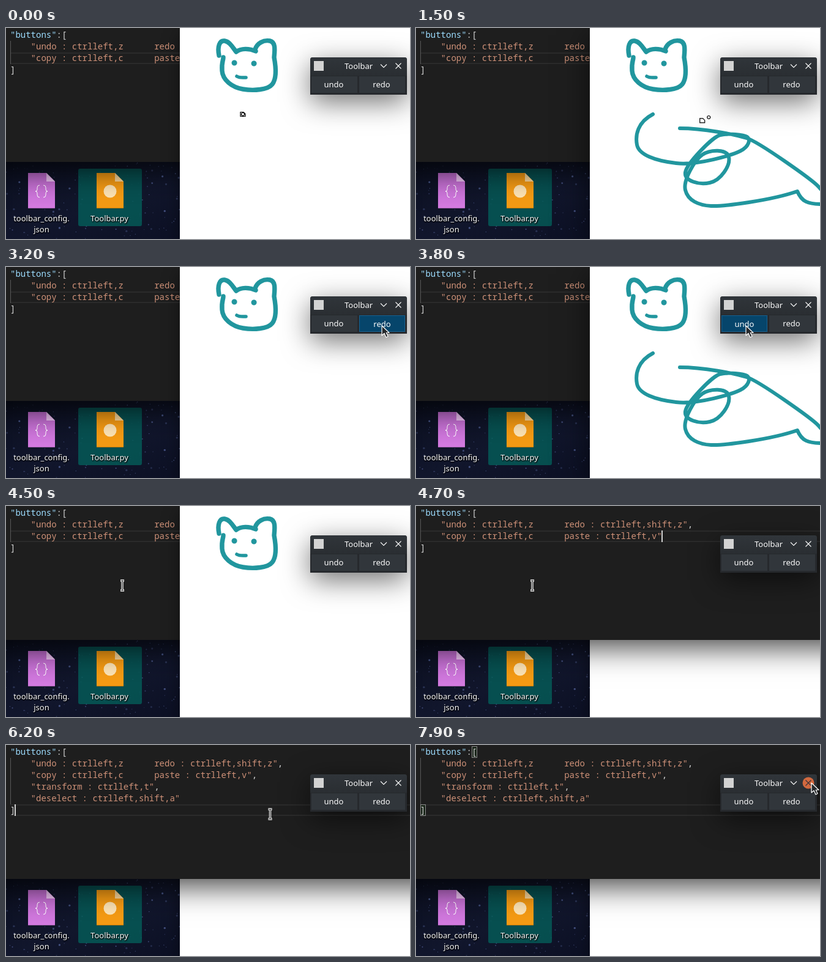
Write an HTML page that moves like this. It is 660x345 px and loops after 8 s.

```html
<!DOCTYPE html>
<html lang="en">
<head>
<meta charset="utf-8">
<title>Toolbar demo</title>
<style>
html, body { margin: 0; width: 100%; height: 100%; overflow: hidden; background: #fff; }
#stage { position: relative; width: 660px; height: 345px; overflow: hidden; font: 13px/18px "Noto Sans", sans-serif; color: #fcfcfc; }
#stage div, #stage svg { position: absolute; }
#stage svg { overflow: visible; }
#desktop { left: 0; top: 219px; width: 284px; height: 126px; overflow: hidden; background: linear-gradient(160deg, #0b0f20, #11162c 55%, #0c1024); }
#selected { left: 118px; top: 11px; width: 104px; height: 94px; border-radius: 3px; background: rgba(4, 92, 88, .82); }
.label { top: 83px; width: 110px; text-align: center; text-shadow: 0 1px 2px #000, 1px 1px 2px #000; }
#canvas { left: 284px; top: 0; width: 500px; height: 345px; background: #fff; z-index: 2; box-shadow: 0 8px 26px rgba(0, 0, 0, .45); }
#canvas.active { box-shadow: 0 12px 46px rgba(0, 0, 0, .6); }
#editor { left: -60px; top: -60px; width: 800px; height: 279px; background: #1e1e1e; z-index: 1; box-shadow: 0 12px 46px rgba(0, 0, 0, .74); }
#editor.active { z-index: 3; }
#code { left: 60px; top: 60px; width: 660px; height: 219px; font: 14px/19px "Noto Sans Mono", "DejaVu Sans Mono", monospace; color: #d4d4d4; }
#code .line { left: 7px; margin-top: -1px; white-space: pre; height: 19px; }
#code b { font-weight: normal; color: #9cdcfe; }
#code i { font-style: normal; color: #ce9178; }
#code .sel { background: #264f78; height: 19px; }
#code .dots { left: 7px; margin-top: -1px; color: #4d7094; }
#current { left: 7px; width: 653px; height: 15px; border: solid #2b2b2b; border-width: 2px 0; }
#guide { left: 7px; top: 21px; width: 1px; background: #585858; }
#caret { width: 2px; height: 19px; background: #d0d0d0; }
.match { width: 7px; height: 17px; border: 1px solid #888; background: rgba(0, 100, 0, .12); }
#toolbar { left: 497px; top: 48px; width: 158px; height: 61px; border-radius: 4px 4px 0 0; background: #26292d; z-index: 4; box-shadow: 0 12px 46px rgba(0, 0, 0, .56); }
#title { left: 0; top: 0; width: 158px; height: 30px; border-radius: 4px 4px 0 0; background: linear-gradient(#30353a, #2a2e32); }
#title span { position: absolute; left: 56px; top: 5px; }
.button { top: 31px; width: 75px; height: 27px; line-height: 27px; text-align: center; background: #31363b; }
.button span { position: relative; left: -1px; }
.button.hover { background: #06456b; outline: 1px dotted #2980b9; outline-offset: -1px; }
.button.down span { left: 0; top: 1px; }
#cursors { left: 0; top: 0; z-index: 5; }
</style>
</head>
<body>
<div id="stage">
  <div id="desktop">
    <svg id="stars" width="284" height="126"></svg>
    <div id="selected"></div>
    <svg id="icons" width="284" height="126"></svg>
    <div class="label" style="left:3px">toolbar_config.<br>json</div>
    <div class="label" style="left:114px">Toolbar.py</div>
  </div>
  <div id="canvas">
    <svg width="376" height="345" viewBox="284 0 376 345" fill="none" stroke="#21969e" stroke-linecap="round" stroke-linejoin="round">
      <g stroke-width="7.4">
        <path d="M348 45C345 30 349 20 357 21S370 31 376 39C384 33 397 33 408 38"/>
        <path d="M407 35C410 25 421 19 431 21S439 37 438 48C441 64 442 83 435 92S405 103 387 100S354 85 353 70S355 54 355 48"/>
        <path d="M373 57h.1M405 58h.1" stroke-width="9"/>
        <path d="M377 79C382 82 387 81 392 81" stroke-width="5.5"/>
      </g>
      <path id="doodle" stroke-width="6" d="M387 141C362 154 358 175 361 191S390 217 425 221S516 208 530 201S547 182 541 178S510 172 497 175S442 222 440 236S462 257 480 253S514 225 511 211S480 199 468 207S436 248 440 265S462 290 482 291S580 282 623 267C630 284 640 288 664 288S666 270 658 260S560 186 540 180S470 164 431 164"/>
    </svg>
  </div>
  <div id="editor"><div id="code">
    <div id="current"></div>
    <div id="selection">
      <div class="sel" style="left:402px;top:40px;width:16px"></div>
      <div class="sel" style="left:0;top:59px;width:258px"></div>
      <div class="sel" style="left:0;top:78px;width:284px"></div>
      <div class="dots" style="top:59px">····<br>····</div>
    </div>
    <div id="guide"></div>
    <div id="matches">
      <div class="match" style="left:91px;top:2px"></div>
      <div class="match" style="left:7px;top:97px"></div>
    </div>
    <div class="line" style="top:2px"><b>"buttons"</b>:[</div>
    <div class="line" style="top:21px">    <i>"undo : ctrlleft,z      redo : ctrlleft,shift,z"</i>,</div>
    <div class="line" style="top:40px">    <i>"copy : ctrlleft,c      paste : ctrlleft,v"</i><span class="extra">,</span></div>
    <div class="line extra" style="top:59px">    <i>"transform : ctrlleft,t"</i>,</div>
    <div class="line extra" style="top:78px">    <i>"deselect : ctrlleft,shift,a"</i></div>
    <div class="line" id="closing">]</div>
    <div id="caret"></div>
  </div></div>
  <div id="toolbar">
    <div id="title"><span>Toolbar</span>
      <svg width="158" height="30" fill="none" stroke="#fcfcfc" stroke-width="1.1">
        <rect x="6" y="6" width="16" height="16" fill="#d3d3d3" stroke="none"/>
        <path d="M115 11.5l5 5l5-5"/>
        <circle id="closeDisc" cx="144" cy="14" r="9.5" fill="#d2693f" stroke="none"/>
        <path id="closeMark" d="M139.5 9.5l9 9m0-9l-9 9"/>
      </svg>
    </div>
    <div class="button" id="undo" style="left:2px"><span>undo</span></div>
    <div class="button" id="redo" style="left:80px"><span>redo</span></div>
  </div>
  <svg id="cursors" width="660" height="345">
    <g id="brush">
      <path id="tool" d="M-4-3.5h5l3 3v4h-8z" fill="#fff" stroke="#000" stroke-width="1.2"/>
      <circle id="ring" r="2.5" fill="none" stroke="#000" stroke-width="1.2"/>
    </g>
    <path id="arrow" d="M0 0V16L4 12.5L7 19L10 17.5L7.3 11.5H12Z" fill="#26292c" stroke="#fff" stroke-width="1.2" stroke-linejoin="round"/>
    <g id="ibeam" fill="none">
      <path d="M-3-8h6M0-8V8M-3 8h6" stroke="#fff" stroke-width="3.4"/>
      <path d="M-2.5-8h5M0-8V8M-2.5 8h5" stroke="#222" stroke-width="1.2"/>
    </g>
  </svg>
</div>
<script>
const LOOP = 8000, STEP = 100;
const DRAW_START = 200, DRAW_END = 1300;
const RAISED = 4700, RESTORED = 5300, CLICKED = 6200, CLOSE_HOVER = 7900;
const UNDO = [539, 96], REDO = [614, 96], CLOSE = [646, 62];

const $ = id => document.getElementById(id);
const show = (el, on) => { el.style.visibility = on ? 'visible' : 'hidden'; };
const place = (el, [x, y]) => el.setAttribute('transform', `translate(${x} ${y})`);
const within = (t, ...spans) => spans.some(([from, to]) => t >= from && t < to);
const clamp = v => Math.min(1, Math.max(0, v));
const easeOut = k => 1 - (1 - k) ** 2;

const doodle = $('doodle'), length = doodle.getTotalLength();
const drawn = t => t < 300 ? 0 : clamp((t - DRAW_START) / (DRAW_END - DRAW_START));

// Pointer moves after the drawing; sag bends the way downwards.
const moves = [
  { from: 1400, until: 1800, to: UNDO, sag: 12 },
  { from: 2500, until: 2800, to: REDO, sag: 0 },
  { from: 3500, until: 3700, to: UNDO, sag: 0 },
  { from: 4000, until: 4500, to: [190, 130], sag: 10 },
  { from: 5500, until: 6200, to: [431.5, 113], sag: 8 },
  { from: 6500, until: 7400, to: [624, 108], sag: 85 },
  { from: 7600, until: 7900, to: CLOSE, sag: 0 }
];

function pointer(t) {
  const tip = doodle.getPointAtLength(length * drawn(t));
  let x = tip.x, y = tip.y;
  for (const { from, until, to, sag } of moves) {
    const k = easeOut(clamp((t - from) / (until - from)));
    x += (to[0] - x) * k;
    y += (to[1] - y) * k + sag * Math.sin(Math.PI * k);
  }
  return [x, y];
}

function buildDesktop() {
  let seed = 7;
  const random = () => (seed = seed * 16807 % 2147483647) / 2147483647;
  let stars = '';
  for (let i = 0; i < 150; i++) {
    const r = random() < .12 ? 1.6 : .5 + random() * .5;
    stars += `<circle cx="${random() * 284}" cy="${random() * 126}" r="${r}" fill="#5c6da8" opacity="${.25 + random() * .5}"/>`;
  }
  $('stars').innerHTML = stars;
  const page = (x, fill, fold) =>
    `<path d="M${x} 18h30l14 14v44h-44z" fill="${fill}"/><path d="M${x + 30} 18v14h14z" fill="${fold}"/>` +
    `<path d="M${x} 75.5h44" stroke="#000" stroke-opacity=".25"/>`;
  $('icons').innerHTML =
    '<linearGradient id="violet" x2="0" y2="1"><stop stop-color="#bd6acb"/><stop offset="1" stop-color="#d57be2"/></linearGradient>' +
    page(36, 'url(#violet)', '#ebc0f0') + page(148, '#f59a13', '#fbd79a') +
    '<path d="M55 38q-4 0-4 4v3q0 3-3 3q3 0 3 3v3q0 4 4 4M61 38q4 0 4 4v3q0 3 3 3q-3 0-3 3v3q0 4-4 4" fill="none" stroke="#fff"/>' +
    '<circle cx="170" cy="48" r="10.5" fill="#fde3b5"/>';
}

function renderEditor(t) {
  const raised = t >= RAISED, restored = t >= RESTORED, clicked = t >= CLICKED;
  $('editor').classList.toggle('active', raised);
  document.querySelectorAll('.extra').forEach(el => show(el, restored));
  show($('selection'), restored && !clicked);
  show($('current'), !restored || clicked);
  $('current').style.top = clicked ? '97px' : '40px';
  $('guide').style.height = restored ? '76px' : '38px';
  $('closing').style.top = restored ? '97px' : '59px';
  show($('matches'), t >= CLICKED + STEP);
  const caret = $('caret');
  show(caret, clicked ? (t - CLICKED) % 1000 < 500 : raised);
  caret.style.left = clicked ? '14px' : '401px';
  caret.style.top = clicked ? '97px' : '40px';
}

function renderToolbar(t, x, y) {
  const pressed = within(t, [2200, 2400], [3200, 3400], [3700, 3900]);
  for (const [id, left] of [['undo', 499], ['redo', 578]]) {
    const over = x > left && x < left + 75 && y > 79 && y < 107;
    $(id).classList.toggle('hover', over);
    $(id).classList.toggle('down', over && pressed);
  }
  const overClose = t >= CLOSE_HOVER;
  show($('closeDisc'), overClose);
  $('closeMark').setAttribute('stroke', overClose ? '#34303a' : '#fcfcfc');
}

function renderCursor(t, x, y) {
  const overToolbar = x > 497 && x < 655 && y > 48 && y < 107;
  const painting = !overToolbar && x > 284 && t < RAISED;
  show($('arrow'), overToolbar);
  show($('brush'), painting);
  show($('ibeam'), !overToolbar && !painting);
  for (const id of ['arrow', 'ibeam', 'ring']) place($(id), [x, y]);
  place($('tool'), pointer(t - 25));
}

function render(t) {
  const [x, y] = pointer(t);
  show(doodle, within(t, [300, 2400], [3400, 3900]));
  doodle.style.strokeDasharray = `${length * drawn(t)} ${length + 10}`;
  $('canvas').classList.toggle('active', within(t, [300, 2200], [2300, 2600], [3300, 3500], [3800, 4000]));
  renderEditor(t);
  renderToolbar(t, x, y);
  renderCursor(t, x, y);
}

function frame(now) {
  render(Math.floor(now % LOOP / STEP) * STEP);
  requestAnimationFrame(frame);
}

buildDesktop();
render(0);
requestAnimationFrame(frame);
</script>
</body>
</html>
```
